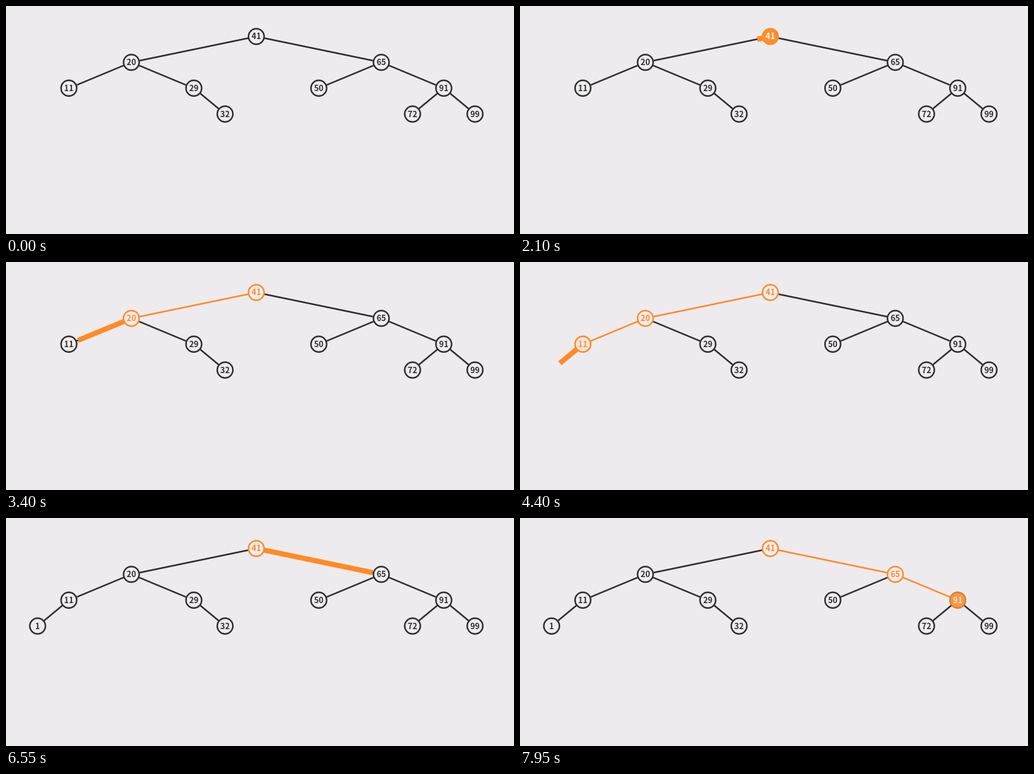
Animation of 800 by 359 pixels, one loop 8000 ms. Source, as an HTML page with a canvas:

```html
<!DOCTYPE html>
<html lang="en">
<head>
<meta charset="utf-8">
<title>Binary search tree insertion</title>
<style>
  html, body { margin: 0; width: 100%; height: 100%; overflow: hidden; background: #edebed; }
  canvas { display: block; width: 800px; height: 359px; }
</style>
</head>
<body>
<canvas id="stage"></canvas>
<script>
const W = 800, H = 359, LOOP = 8000, STEP = 500;
const RADIUS = 12.3, RIM = 13.4, LINE = 2.45, THICK = 8.2;
const DARK = [47, 45, 47], ORANGE = [255, 138, 39], PALE = [238, 237, 238], WHITE = [255, 255, 255];

const LOOKS = {
  base: { fill: PALE, ring: DARK, text: DARK },
  hot: { fill: ORANGE, ring: ORANGE, text: WHITE },
  seen: { fill: PALE, ring: ORANGE, text: ORANGE }
};

const FADE = 5087, BORN = 4566;

// column and depth on the grid, then the timed changes of look
const nodes = {
  41: { col: 7, row: 0, cues: [[1485, 'hot'], [1990, 'seen'], [FADE, 'base'], [5590, 'hot'], [6095, 'seen']] },
  20: { col: 3, row: 1, cues: [[2495, 'hot'], [3000, 'seen'], [FADE, 'base']] },
  65: { col: 11, row: 1, cues: [[6600, 'hot'], [7105, 'seen']] },
  11: { col: 1, row: 2, cues: [[3505, 'hot'], [4045, 'seen'], [FADE, 'base']] },
  29: { col: 5, row: 2, cues: [] },
  50: { col: 9, row: 2, cues: [] },
  91: { col: 13, row: 2, cues: [[7612, 'hot']] },
  1: { col: 0, row: 3, cues: [[BORN, 'hot'], [FADE, 'base']], born: BORN },
  32: { col: 6, row: 3, cues: [] },
  72: { col: 12, row: 3, cues: [] },
  99: { col: 14, row: 3, cues: [] }
};
for (const n of Object.values(nodes)) {
  n.x = 49.8 + n.col * 49.2;
  n.y = 48 + n.row * 40.7;
}

// walk: when the highlight runs along the edge; fade: when it returns to dark
const edges = [
  { from: 41, to: 20, walk: 1990, fade: FADE },
  { from: 41, to: 65, walk: 6095 },
  { from: 20, to: 11, walk: 3000, fade: FADE },
  { from: 20, to: 29 },
  { from: 65, to: 50 },
  { from: 65, to: 91, walk: 7105 },
  { from: 11, to: 1, walk: 4045, fade: FADE, born: 4045 },
  { from: 29, to: 32 },
  { from: 91, to: 72 },
  { from: 91, to: 99 }
];

const canvas = document.getElementById('stage');
const ctx = canvas.getContext('2d');
const ratio = window.devicePixelRatio || 1;
canvas.width = W * ratio;
canvas.height = H * ratio;

const ease = x => x < 0.5 ? 4 * x ** 3 : 1 - 4 * (1 - x) ** 3;
const progress = (t, start) => ease(Math.min(1, Math.max(0, (t - start) / STEP)));
const mix = (a, b, p) => a.map((v, i) => v + (b[i] - v) * p);
const css = c => `rgb(${c.map(Math.round).join(',')})`;

function lookAt(cues, t) {
  let look = LOOKS.base;
  for (const [start, name] of cues) {
    if (t < start) break;
    const p = progress(t, start), next = LOOKS[name], blend = {};
    for (const part in next) blend[part] = mix(look[part], next[part], p);
    look = blend;
  }
  return look;
}

function strokeEdge(a, b, part, width, color) {
  const dx = b.x - a.x, dy = b.y - a.y, len = Math.hypot(dx, dy);
  const ux = dx / len, uy = dy / len, reach = RIM + (len - 2 * RIM) * part;
  ctx.beginPath();
  ctx.moveTo(a.x + ux * (RIM - 1), a.y + uy * (RIM - 1));
  ctx.lineTo(a.x + ux * reach, a.y + uy * reach);
  ctx.lineWidth = width;
  ctx.strokeStyle = css(color);
  ctx.stroke();
}

function drawEdge(e, t) {
  const a = nodes[e.from], b = nodes[e.to];
  const walked = t >= e.walk + STEP;
  if (!(t < e.born + STEP)) {
    let color = walked ? ORANGE : DARK;
    if (walked && e.fade) color = mix(ORANGE, DARK, progress(t, e.fade));
    strokeEdge(a, b, 1, LINE, color);
  }
  if (t >= e.walk && !walked) {
    const p = progress(t, e.walk);
    if (p > 0.002) strokeEdge(a, b, p, THICK, ORANGE);
  }
}

function drawNode(label, n, t) {
  const size = n.born ? progress(t, n.born) : 1;
  if (size < 0.01) return;
  const look = lookAt(n.cues, t);
  ctx.save();
  ctx.translate(n.x, n.y);
  ctx.scale(size, size);
  ctx.beginPath();
  ctx.arc(0, 0, RADIUS, 0, Math.PI * 2);
  ctx.fillStyle = css(look.fill);
  ctx.fill();
  ctx.lineWidth = LINE;
  ctx.strokeStyle = css(look.ring);
  ctx.stroke();
  ctx.fillStyle = css(look.text);
  ctx.fillText(label, 0, 4.4);
  ctx.restore();
}

function draw(t) {
  ctx.setTransform(ratio, 0, 0, ratio, 0, 0);
  ctx.fillStyle = '#edebed';
  ctx.fillRect(0, 0, W, H);
  ctx.font = 'bold 12.5px "Noto Sans CJK JP", "Noto Sans CJK SC", "Noto Sans", sans-serif';
  ctx.textAlign = 'center';
  for (const e of edges) drawEdge(e, t);
  for (const label in nodes) drawNode(label, nodes[label], t);
}

const begin = performance.now();
function tick() {
  draw((performance.now() - begin) % LOOP);
  requestAnimationFrame(tick);
}
tick();
</script>
</body>
</html>
```
